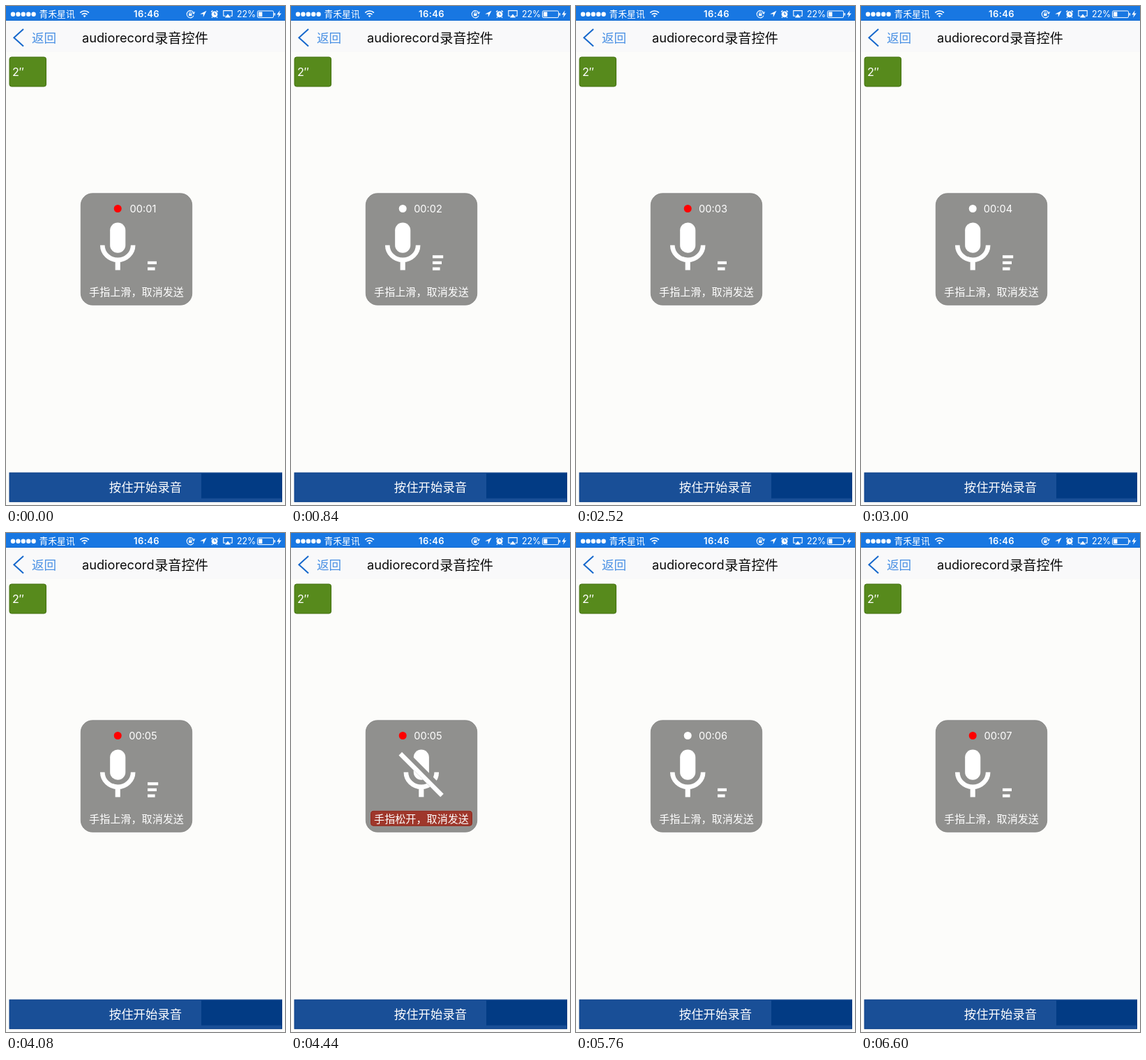
An HTML page for the animation above (6720 ms loop, 400 by 713 pixels).

```html
<!DOCTYPE html>
<html lang="zh">
<head>
<meta charset="utf-8">
<title>录音</title>
<style>
  html, body { margin: 0; width: 100%; height: 100%; overflow: hidden; background: #fcfcfa; }
  svg { display: block; width: 100vw; height: 100vh; }
  text { font-family: Inter, "Noto Sans CJK SC", "Noto Sans CJK", sans-serif; fill: #fff; }
  .mid { text-anchor: middle; }
  .line { fill: none; stroke: #fff; }
  .white { fill: #fff; }
  .title { fill: #0a0a0a; }
  .back { fill: #4990e4; }
</style>
</head>
<body>
<svg viewBox="0 0 400 713" preserveAspectRatio="none">
  <defs>
    <g id="mic">
      <rect x="8.95" y="2" width="6.2" height="12.1" rx="3.1" class="white"/>
      <path d="M5.9 11a6.15 5.9 0 0 0 12.3 0" class="line" stroke-width="1.85"/>
      <path d="M12.05 17v4" class="line" stroke-width="2"/>
    </g>
    <mask id="cut" maskUnits="userSpaceOnUse" x="0" y="0" width="24" height="24">
      <rect width="24" height="24" fill="#fff"/>
      <path d="M0 -1.275l24 24" stroke="#000" stroke-width="3.6"/>
    </mask>
  </defs>

  <rect width="400" height="713" fill="#fcfcfa"/>

  <!-- status bar -->
  <rect width="400" height="21" fill="#1877e2"/>
  <rect y="20" width="400" height="1" fill="#0f69d2"/>
  <g class="white">
    <circle cx="10" cy="11.7" r="3.2"/>
    <circle cx="17.4" cy="11.7" r="3.2"/>
    <circle cx="24.8" cy="11.7" r="3.2"/>
    <circle cx="32.2" cy="11.7" r="3.2"/>
    <circle cx="39.6" cy="11.7" r="3.2"/>
  </g>
  <text x="47.5" y="16.3" font-size="12.8">青禾星讯</text>
  <g class="line" stroke-width="1.6">
    <path d="M106.3 9.6a9 9 0 0 1 12.6 0M108.7 12.2a5.5 5.5 0 0 1 7.8 0"/>
    <path d="M112.6 16.2l-2-2.1a3 3 0 0 1 4 0z" fill="#fff" stroke="none"/>
  </g>
  <text x="201.5" y="16" font-size="13" font-weight="600" letter-spacing=".4" class="mid">16:46</text>
  <g class="line" stroke-width="1.1">
    <path d="M268.9 9.4a5.1 5.1 0 1 0 .2 4.2M270.4 8.2l-1.2 3-2.4-1.8"/>
    <rect x="262" y="10.8" width="4.4" height="3.4" fill="#fff" stroke="none"/>
    <path d="M262.9 11v-1.2a1.3 1.3 0 0 1 2.6 0V11" stroke-width=".8"/>
    <path d="M287.5 6.8l-9.3 4.6h4.6v4.6z" fill="#fff" stroke="none"/>
    <circle cx="299" cy="11.8" r="4.4" fill="#fff" stroke="none"/>
    <path d="M294.2 8.6l2.2-2M303.8 8.6l-2.2-2M296 15.6l-1 1.2M302 15.6l1 1.2" stroke-width="1.4"/>
    <path d="M299 9.2v2.8h2.2" stroke="#1877e2"/>
    <path d="M314.6 14.2h-2.8V6.6h12.4v7.6h-2.8"/>
    <path d="M318 11.6l4.2 5h-8.4z" fill="#fff" stroke="none"/>
    <rect x="360.5" y="7" width="23" height="9.6" rx="1.6" stroke-width="1"/>
    <rect x="362" y="8.5" width="5.4" height="6.6" fill="#fff" stroke="none"/>
    <path d="M385.3 10v3.6" stroke-width="1.5"/>
    <path d="M392.8 6.2l-4.6 6.2h3l-1.2 4.4 4.8-6.2h-3z" fill="#fff" stroke="none"/>
  </g>
  <text x="331" y="16" font-size="12.4">22%</text>

  <!-- title bar -->
  <rect y="21" width="400" height="44.5" fill="#f9f9fa"/>
  <path d="M25 33L11.4 45.3 25 57.6" fill="none" stroke="#1768cc" stroke-width="2"/>
  <text x="37" y="51.8" font-size="17.6" class="back">返回</text>
  <text x="109" y="52.3" font-size="18.2" class="title">audiorecord</text>
  <text x="213.2" y="52.7" font-size="19.2" class="title">录音控件</text>

  <!-- recorded clip -->
  <rect x="5" y="73" width="52.5" height="42" rx="3" fill="#578a1c" stroke="#42700f"/>
  <text x="9" y="100" font-size="16.2">2″</text>

  <!-- recorder panel -->
  <rect x="107.3" y="267.8" width="159.4" height="159.4" rx="16.5" fill="#90908e" stroke="#80807e" stroke-width=".8"/>
  <circle id="dot" cx="160.2" cy="289.5" r="5.5"/>
  <text id="clock" x="196.5" y="295" font-size="14.6" class="mid"></text>
  <g id="live">
    <use href="#mic" transform="translate(117.2 302.4) scale(3.57)"/>
    <g class="white">
      <rect x="203" y="373.4" width="10.6" height="4.2"/>
      <rect x="203" y="364.8" width="13" height="4.2"/>
      <rect id="bar" x="203" y="356.2" width="15.2" height="4.2"/>
    </g>
    <text x="187" y="413.8" font-size="15.1" class="mid">手指上滑，取消发送</text>
  </g>
  <g id="muted">
    <g transform="translate(143.8 302.4) scale(3.57)">
      <g mask="url(#cut)"><use href="#mic"/></g>
      <path d="M3.635 3.635L20.365 20.365" class="line" stroke-width="1.8"/>
    </g>
    <rect x="113.5" y="396.3" width="147" height="23" rx="4.5" fill="#a3a09d"/>
    <rect x="114.5" y="397.3" width="145" height="21" rx="3.5" fill="#9f372b" stroke="#8c281d"/>
    <text x="187" y="413.8" font-size="15.1" class="mid">手指松开，取消发送</text>
  </g>

  <!-- record button -->
  <rect x="5" y="667" width="390.5" height="41.3" fill="#194f97" stroke="#0a3f88"/>
  <rect x="280" y="668" width="116" height="35.5" fill="#023b84"/>
  <text x="200" y="694" font-size="17.4" class="mid">按住开始录音</text>
</svg>
<script>
  const LOOP = 6720;
  const ticks = [720, 1800, 2880, 4080, 5160, 6360];
  const levelFlips = [480, 600, 840, 2520, 2640, 2760, 3000, 4200, 5880, 6000, 6120, 6240, 6480, 6600];
  const mute = { from: 4440, to: 5760 };

  const [dot, clock, live, muted, bar] =
    ['dot', 'clock', 'live', 'muted', 'bar'].map(id => document.getElementById(id));
  const passed = (times, t) => times.filter(x => x <= t).length;
  const show = (el, on) => el.setAttribute('visibility', on ? 'visible' : 'hidden');

  function draw(now) {
    const t = now % LOOP;
    const sec = 1 + passed(ticks, t);
    const off = t >= mute.from && t < mute.to;
    const label = '00:0' + sec;
    if (clock.textContent !== label) clock.textContent = label;
    dot.setAttribute('fill', sec % 2 ? '#ff0000' : '#ffffff');
    show(live, !off);
    show(muted, off);
    show(bar, !off && passed(levelFlips, t) % 2 === 1);
    requestAnimationFrame(draw);
  }
  draw(performance.now());
</script>
</body>
</html>
```
